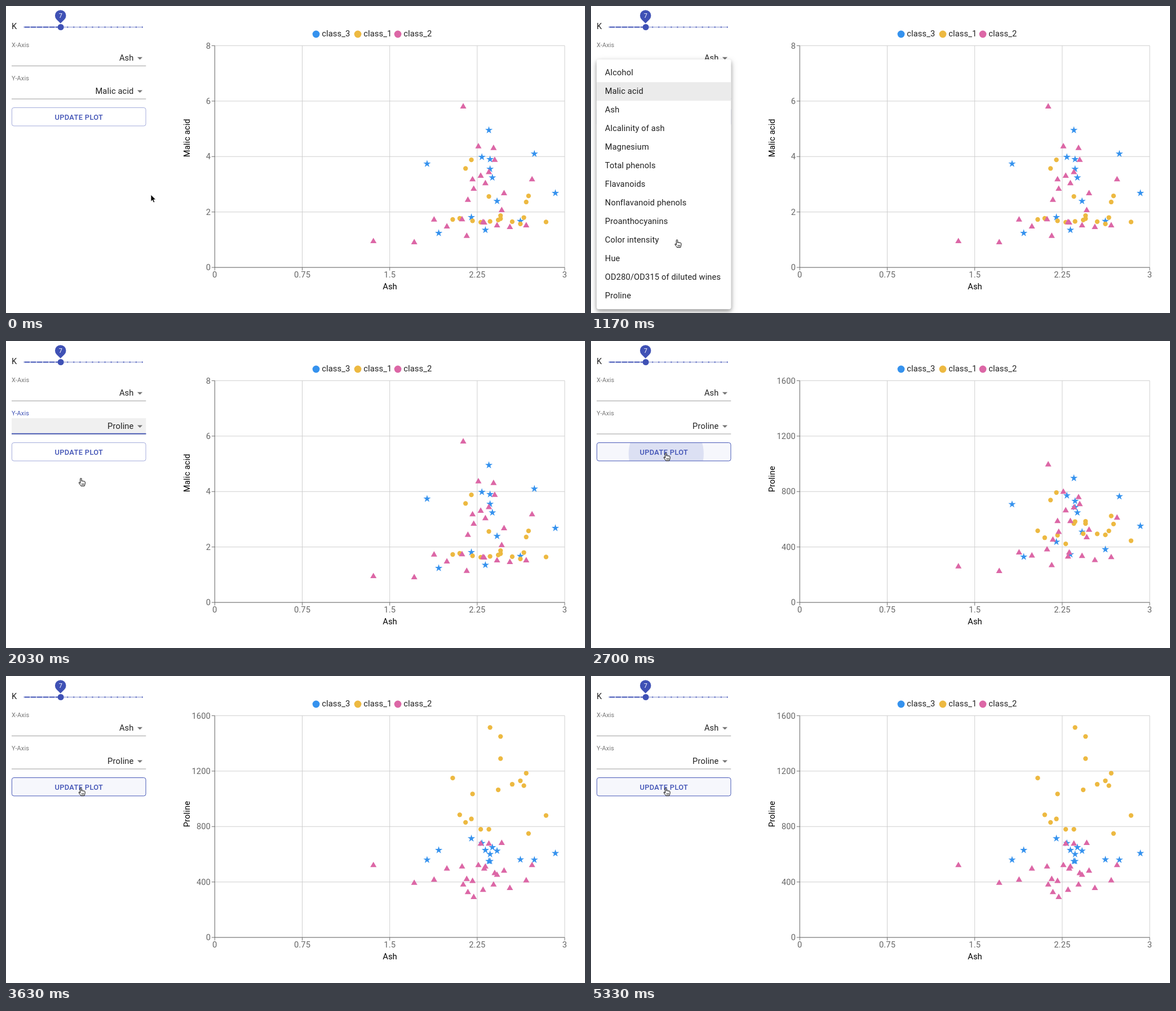
These frames come from a looping animation (1027 px wide and 545 px high, 5.36 s). An HTML page:

```html
<!DOCTYPE html>
<html lang="en">
<head>
<meta charset="utf-8">
<title>Scatter plot</title>
<style>
html, body { margin: 0; width: 100%; height: 100%; overflow: hidden; background: #fff; }
svg { display: block; width: 100%; height: 100%; }
text { font: 14.67px Roboto, sans-serif; letter-spacing: .00938em; fill: rgba(0,0,0,.87); white-space: pre; }
.small { font-size: 11px; fill: rgba(0,0,0,.54); }
.tick { fill: #666; }
.title { fill: #000; }
.paper { filter: drop-shadow(0 3px 3px rgba(0,0,0,.28)) drop-shadow(0 4px 6px rgba(0,0,0,.2)); }
</style>
</head>
<body>
<svg id="stage" viewBox="0 0 1027 545"></svg>
<script>
const LOOP = 5360;
const HOVER = 390, OPEN = 640, PICK_DOWN = 1590, PICK = 1690;
const PRESS = 2503, RELEASE = 2545, UPDATE = 2616;
const GROW = 345, MOVE = 400, RIPPLE = 550, FOCUS = 200;
const BLUE = '#3f51b5';
const LEFT = 370.3, RIGHT = 991, TOP = 70.4, BOTTOM = 464.1;

// Each point: ash, malic acid, proline
const class3 = [
  [1.82, 3.74, 560], [1.92, 1.24, 630], [2.2, 1.81, 714], [2.29, 3.98, 680], [2.32, 1.35, 630],
  [2.35, 4.95, 550], [2.36, 3.9, 550], [2.36, 3.55, 600], [2.38, 3.24, 650], [2.42, 2.39, 625],
  [2.62, 1.67, 562], [2.74, 4.1, 560], [2.92, 2.68, 607]
];
const class1 = [
  [2.04, 1.73, 1150], [2.1, 1.77, 885], [2.15, 3.57, 830], [2.2, 3.88, 855], [2.21, 1.68, 1035],
  [2.28, 1.63, 780], [2.35, 2.56, 780], [2.36, 1.66, 1515], [2.43, 1.71, 1065], [2.45, 1.87, 1290],
  [2.45, 1.76, 1450], [2.55, 1.65, 1105], [2.62, 1.57, 1130], [2.65, 1.8, 1095], [2.67, 2.36, 1185],
  [2.69, 2.58, 750], [2.84, 1.64, 880]
];
const class2 = [
  [1.36, .94, 520], [1.71, .9, 392], [1.88, 1.72, 415], [1.99, 1.47, 495], [2.12, 1.73, 510],
  [2.13, 5.8, 380], [2.16, 1.13, 420], [2.17, 2.43, 325], [2.21, 3.17, 406], [2.22, 2.83, 290],
  [2.26, 4.36, 520], [2.28, 3.3, 675], [2.3, 1.63, 342], [2.31, 1.61, 495], [2.32, 3.03, 510],
  [2.35, 3.43, 675], [2.39, 4.3, 380], [2.4, 3.87, 463], [2.42, 1.51, 450], [2.46, 2.06, 680],
  [2.48, 2.67, 480], [2.53, 1.45, 355], [2.67, 1.51, 410], [2.72, 3.17, 520]
];

const items = ['Alcohol', 'Malic acid', 'Ash', 'Alcalinity of ash', 'Magnesium', 'Total phenols', 'Flavanoids',
  'Nonflavanoid phenols', 'Proanthocyanins', 'Color intensity', 'Hue', 'OD280/OD315 of diluted wines', 'Proline'];

const stage = document.getElementById('stage');

function add(tag, attrs, parent = stage, content) {
  const el = document.createElementNS(stage.namespaceURI, tag);
  set(el, attrs);
  if (content !== undefined) el.textContent = content;
  return parent.appendChild(el);
}
function set(el, attrs) {
  for (const k in attrs) el.setAttribute(k, attrs[k]);
}
const label = (x, y, str, attrs = {}, parent) => add('text', { x, y, ...attrs }, parent, str);
const line = (x1, y1, x2, y2, stroke, w = .92) => add('line', { x1, y1, x2, y2, stroke, 'stroke-width': w });
const box = (x, y, width, height, fill, parent, attrs = {}) => add('rect', { x, y, width, height, fill, ...attrs }, parent);

const clamp = v => Math.max(0, Math.min(1, v));
const span = (t, start, length) => clamp((t - start) / length);
const smooth = v => v * v * (3 - 2 * v);

// cubic-bezier(.4, 0, .2, 1)
function ease(x) {
  let lo = 0, hi = 1;
  for (let i = 0; i < 20; i++) {
    const s = (lo + hi) / 2, r = 1 - s;
    if (1.2 * s * r * r + .6 * s * s * r + s * s * s < x) lo = s; else hi = s;
  }
  return smooth(lo);
}

function clipRect(id, x, y, w, h, rx) {
  box(x, y, w, h, '#000', add('clipPath', { id }), { rx });
  return `url(#${id})`;
}

// Slider
label(10, 41, 'K');
box(31, 36.6, 211, 1.83, BLUE, stage, { opacity: .38 });
box(31, 36.6, 66, 1.83, BLUE);
for (let i = 0; i < 20; i++) {
  box(31 + i * 11.05, 36.6, 1.83, 1.83, i < 7 ? '#fff' : BLUE, stage, { opacity: i < 7 ? .8 : 1 });
}
add('circle', { cx: 97.1, cy: 37.5, r: 5.5, fill: BLUE });
add('path', { d: 'M89.8 23.9a9.8 9.8 0 1 1 13.8 0L96.7 30.8z', fill: BLUE });
label(96.8, 20.8, '7', { class: 'small', 'text-anchor': 'middle', style: 'fill:#fff' });

// Selects
function select(y, name, value) {
  const back = box(10, y - 28, 238.3, 28.5, '#f0f0f0', stage, { opacity: 0 });
  const caption = label(10, y - 33, name, { class: 'small' });
  const text = label(226.5, y - 9.2, value, { 'text-anchor': 'end' });
  add('path', { d: `M232.9 ${y - 15.6}h9.2l-4.6 4.6z`, fill: '#757575' });
  const rule = line(10, y, 248.3, y, '#949494');
  const focus = line(10, y - .3, 248.3, y - .3, BLUE, 1.83);
  focus.setAttribute('visibility', 'hidden');
  return { back, caption, text, rule, focus };
}
select(106.3, 'X-Axis', 'Ash');
const ySelect = select(165, 'Y-Axis', 'Malic acid');

// Button
const button = box(10.4, 180.5, 237.6, 32.4, '#fff', stage, { rx: 3.6, 'stroke-width': .95 });
const buttonRipple = add('circle', { cx: 133.3, cy: 200, fill: BLUE, 'clip-path': clipRect('bc', 10.5, 180.8, 237.5, 32, 3.6) });
label(129.3, 201.5, 'UPDATE PLOT', {
  'text-anchor': 'middle',
  style: `font-weight:500;font-size:12.83px;letter-spacing:.02857em;fill:${BLUE}`
});

// Chart frame
const yTicks = [];
for (let i = 0; i <= 4; i++) {
  const x = LEFT + (RIGHT - LEFT) * i / 4, y = BOTTOM - (BOTTOM - TOP) * i / 4;
  line(x, TOP, x, BOTTOM, '#ccc');
  line(LEFT, y, RIGHT, y, '#ccc');
  line(x, BOTTOM, x, BOTTOM + 5.5, '#666');
  line(LEFT - 5.5, y, LEFT, y, '#666');
  label(x, 482, i * .75, { class: 'tick', 'text-anchor': 'middle' });
  yTicks.push(label(363, y + 5.2, '', { class: 'tick', 'text-anchor': 'end' }));
}
line(LEFT, TOP, LEFT, BOTTOM, '#666');
line(LEFT, BOTTOM, RIGHT, BOTTOM, '#666');
label(681, 502.8, 'Ash', { class: 'title', 'text-anchor': 'middle' });
const yTitle = label(0, 0, '', { class: 'title', transform: 'translate(326 268.3) rotate(-90)' });

// Series
const star = 'M' + Array.from({ length: 10 }, (_, i) => {
  const r = i % 2 ? 2.64 : 6.92, a = i * Math.PI / 5;
  return `${(r * Math.sin(a)).toFixed(2)} ${(-r * Math.cos(a)).toFixed(2)}`;
}).join('L') + 'z';
const disc = 'M-4.14 0a4.14 4.14 0 1 1 8.28 0a4.14 4.14 0 1 1-8.28 0z';
const triangle = 'M0-6.44L5.57 3.22H-5.57z';
const series = [
  ['class_3', '#3592ee', star, class3, 550],
  ['class_1', '#edb941', disc, class1, 624],
  ['class_2', '#dc67a6', triangle, class2, 695]
];
const marks = [];
for (const [name, fill, d, data, x] of series) {
  add('circle', { cx: x, cy: 50, r: 6.4, fill });
  label(x + 10.2, 54.2, name);
  for (const [ash, malic, proline] of data) {
    marks.push({
      el: add('path', { d, fill }),
      x: LEFT + ash / 3 * (RIGHT - LEFT),
      from: BOTTOM - malic / 8 * (BOTTOM - TOP),
      to: BOTTOM - proline / 1600 * (BOTTOM - TOP)
    });
  }
}

// Menu
const ROW = 33, ROW0 = 102.2;
const menu = add('g', {});
box(10, 94.8, 238.5, 443.5, '#fff', menu, { rx: 3.7, class: 'paper' });
const chosen = box(10, 0, 238.5, ROW, '#ebebeb', menu);
const hover = box(10, ROW0 + 12 * ROW, 238.5, ROW, '#000', menu);
const menuRipple = add('circle', { cx: 134, cy: 514, 'clip-path': clipRect('mc', 10, ROW0 + 12 * ROW, 238.5, ROW, 0) }, menu);
items.forEach((name, i) => label(24.8, ROW0 + i * ROW + 21.2, name, {}, menu));

// Pointer
const arrow = add('path', {
  d: 'M0 0V12.2L2.8 9.6L4.7 14L6.8 13.1L4.9 8.8H8.7z',
  fill: '#000', stroke: '#fff', 'stroke-width': .8
});
const hand = add('g', { 'stroke-width': 1, stroke: '#000', 'stroke-linejoin': 'round', 'stroke-linecap': 'round' });
add('path', {
  d: 'M4 9.5V2a1.2 1.2 0 0 1 2.4 0V6.2c0-1.3 2.2-1.2 2.2.2c0-1.2 2.1-1 2.1.4c0-1 1.9-.9 1.9.7v3c0 1.6-1 2.2-1.2 4H5.2c-.3-1.5-2.2-3-3.4-5c-.9-1.4.6-2.4 2.2 0z',
  fill: '#fff'
}, hand);
add('path', { d: 'M6.9 10.2v2.4M8.6 10.2v2.4M10.2 10.2v2.4', fill: 'none', 'stroke-width': .7 }, hand);

// Moves: start, end, x, y
const moves = [[30, 480, 201, 151], [700, 1418, 134, 514], [1700, 2134, 132.5, 198.5]];

function drawPointer(t) {
  let x = 257, y = 335;
  for (const [start, end, mx, my] of moves) {
    const p = smooth(span(t, start, end - start));
    x += (mx - x) * p;
    y += (my - y) * p;
  }
  const inside = (a, b) => y >= a && y <= b;
  const open = t >= OPEN && t < PICK + GROW + 5;
  const link = x < 248 && (open || inside(78, 106) || inside(137, 165) || inside(180, 213));
  set(arrow, { transform: `translate(${x} ${y})`, visibility: link ? 'hidden' : 'visible' });
  set(hand, { transform: `translate(${x - 5} ${y - .5})`, visibility: link ? 'visible' : 'hidden' });
}

function drawRipple(el, t, down, up) {
  const p = ease(span(t, down, RIPPLE));
  set(el, { r: 127 * p, opacity: p ? (.1 + .2 * p) * (1 - ease(span(t, up, RIPPLE))) : 0 });
}

function drawMenu(t) {
  const closing = t >= PICK;
  const fade = closing ? 1 - ease(span(t, PICK, GROW)) : ease(span(t, OPEN, GROW));
  const size = closing
    ? 1 - ease(span(t, PICK + GROW / 3, GROW * 2 / 3))
    : ease(span(t, OPEN, GROW * 2 / 3));
  set(menu, {
    opacity: fade,
    visibility: fade > 0 ? 'visible' : 'hidden',
    transform: `translate(129.2 151) scale(${.75 + .25 * size} ${.5625 + .4375 * size}) translate(-129.2 -151)`
  });
  chosen.setAttribute('y', ROW0 + ROW * (closing ? 12 : 1));
  hover.setAttribute('opacity', closing ? 0 : .04 * span(t, 1320, 150));
  drawRipple(menuRipple, t, PICK_DOWN, PICK);
}

function drawForm(t) {
  const focused = t >= OPEN && t < PRESS;
  const hovered = t >= HOVER && t < OPEN;
  const grow = ease(span(t, OPEN, FOCUS)) * (1 - ease(span(t, PRESS, FOCUS)));
  ySelect.text.textContent = t < PICK ? 'Malic acid' : 'Proline';
  ySelect.caption.style.fill = focused ? BLUE : '';
  ySelect.back.setAttribute('opacity', focused ? 1 : 0);
  set(ySelect.rule, { stroke: hovered ? '#212121' : '#949494', 'stroke-width': hovered ? 1.83 : .92 });
  set(ySelect.focus, {
    x1: 129.2 - 119.2 * grow, x2: 129.2 + 119.2 * grow,
    visibility: grow > 0 ? 'visible' : 'hidden'
  });
  const lit = ease(span(t, 2075, 250));
  set(button, { fill: `rgba(63,81,181,${.045 * lit})`, stroke: `rgba(63,81,181,${.5 + .5 * lit})` });
  drawRipple(buttonRipple, t, PRESS, RELEASE);
}

function drawChart(t) {
  const updated = t >= UPDATE;
  const p = span(t, UPDATE, MOVE);
  yTicks.forEach((el, i) => el.textContent = i * (updated ? 400 : 2));
  yTitle.textContent = updated ? 'Proline' : 'Malic acid';
  for (const m of marks) m.el.setAttribute('transform', `translate(${m.x} ${m.from + (m.to - m.from) * p})`);
}

function frame() {
  const t = performance.now() % LOOP;
  drawForm(t);
  drawChart(t);
  drawMenu(t);
  drawPointer(t);
  requestAnimationFrame(frame);
}
frame();
</script>
</body>
</html>
```
